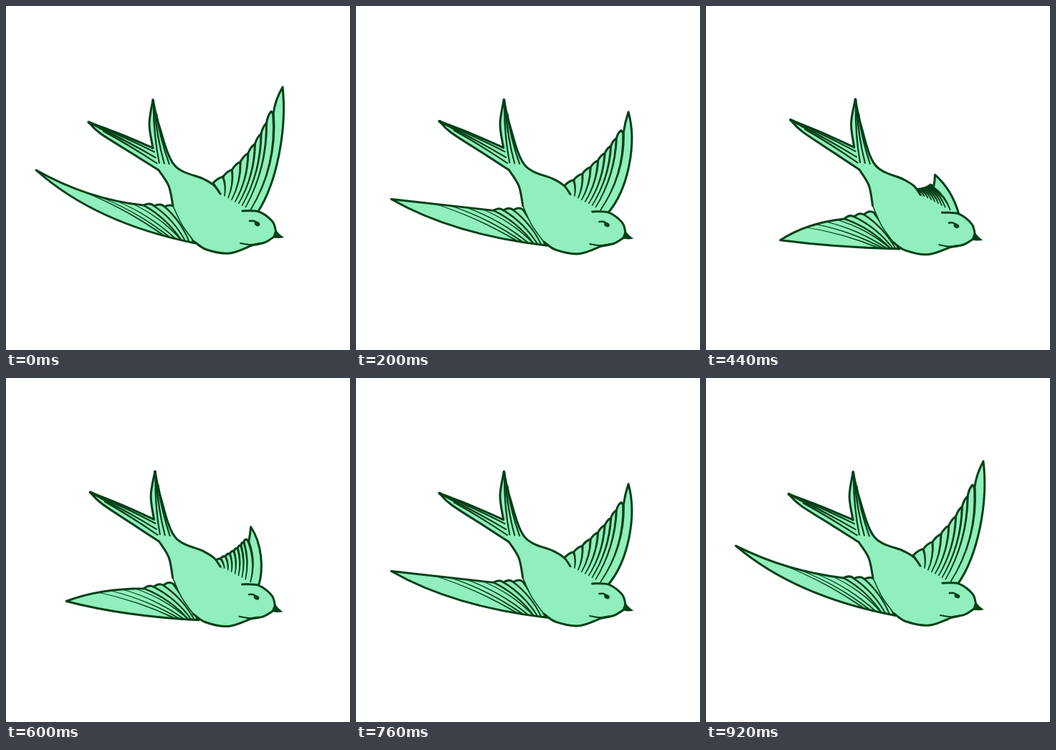
Animation, 480 px wide and 480 px high, one loop 960 ms. Source, as an HTML page with a canvas:

```html
<!DOCTYPE html>
<html lang="en">
<head>
<meta charset="utf-8">
<title>Swallow</title>
<style>
html, body { margin: 0; width: 100%; height: 100%; overflow: hidden; background: #fff; }
canvas { display: block; width: 480px; height: 480px; }
</style>
</head>
<body>
<canvas id="stage" width="480" height="480"></canvas>
<script>
const ctx = document.getElementById('stage').getContext('2d');
const LOOP = 960, STEP = 40;
const FILL = '#90efbc', INK = '#033f18';
const OUTLINE = 3;

const mix = (a, b, t) => a.map((v, i) => v + (b[i] - v) * t);
const curveAt = (a, c, b, t) => mix(mix(a, c, t), mix(c, b, t), t);

// Parabola through the raised, level and lowered positions of a point.
const swing = (up, level, down) => d => up.map((v, i) =>
  v * (1 - d) * (1 - 2 * d) + level[i] * 4 * d * (1 - d) + down[i] * d * (2 * d - 1));

const NEAR = {
  tip: swing([42, 229], [54, 278], [104, 327]),
  upper: swing([115, 270], [115, 279], [140, 303]),
  lower: swing([125, 303], [140, 322], [182, 337]),
  shoulder: swing([192, 278], [192, 287], [193, 297]),
  top: swing([236, 281], [233, 285], [234, 288]),
  root: swing([264, 331], [267, 335], [270, 339])
};
const FAR = {
  tip: swing([386, 113], [375, 158], [319, 236]),
  second: swing([370, 147], [366, 182], [314, 250]),
  trail: swing([346, 214], [342, 222], [308, 256]),
  back: swing([289, 247], [291, 252], [293, 257]),
  lead: swing([392, 170], [388, 198], [335, 250]),
  wrist: swing([379, 245], [378, 258], [347, 270]),
  front: swing([351, 288], [351, 290], [353, 291])
};
const pose = (wing, d) =>
  Object.fromEntries(Object.entries(wing).map(([name, at]) => [name, at(d)]));

// 0 with the wings raised, 1 with them lowered
function dropAt(t) {
  const s = 1 - Math.abs(1 - t / (LOOP / 2));
  return 0.525 * (s + (1 - Math.cos(Math.PI * s)) / 2);
}

// Continues the path smoothly through the points, starting at the first.
function spline(p) {
  for (let i = 0; i < p.length - 1; i++) {
    const a = p[i - 1] || p[i], b = p[i], c = p[i + 1], d = p[i + 2] || c;
    ctx.bezierCurveTo(
      b[0] + (c[0] - a[0]) / 6, b[1] + (c[1] - a[1]) / 6,
      c[0] - (d[0] - b[0]) / 6, c[1] - (d[1] - b[1]) / 6, ...c);
  }
}

function line(points, width = OUTLINE) {
  ctx.beginPath();
  ctx.moveTo(...points[0]);
  spline(points);
  ctx.lineWidth = width;
  ctx.stroke();
}

// Point beside the segment a-b at share t, moved off by the distance k.
function beside(a, b, t, k) {
  const dx = b[0] - a[0], dy = b[1] - a[1], len = Math.hypot(dx, dy) || 1;
  const p = mix(a, b, t);
  return [p[0] + dy / len * k, p[1] - dx / len * k];
}

// A bowed stroke that changes from width w at a to w2 at b.
function taper(a, b, bow, w, w2) {
  const off = bow * Math.hypot(b[0] - a[0], b[1] - a[1]), half = (w + w2) / 4;
  ctx.beginPath();
  ctx.moveTo(...beside(a, b, 0, w / 2));
  ctx.quadraticCurveTo(...beside(a, b, 0.5, off + half), ...beside(a, b, 1, w2 / 2));
  ctx.lineTo(...beside(a, b, 1, -w2 / 2));
  ctx.quadraticCurveTo(...beside(a, b, 0.5, off - half), ...beside(a, b, 0, -w / 2));
  ctx.fill();
}

function scallops(notches, lift) {
  for (let i = 1; i < notches.length; i++) {
    const a = notches[i - 1], b = notches[i];
    ctx.quadraticCurveTo(...beside(a, b, 0.6, lift), ...b);
  }
}

function paint() {
  ctx.closePath();
  ctx.fillStyle = FILL;
  ctx.fill();
  ctx.lineWidth = OUTLINE;
  ctx.stroke();
  ctx.fillStyle = INK;
}

function drawNearWing(d) {
  const { tip, upper, lower, shoulder, top, root } = pose(NEAR, d);
  const notches = [0, 1, 2, 3].map(i => mix(shoulder, top, i / 3));

  ctx.beginPath();
  ctx.moveTo(...tip);
  ctx.quadraticCurveTo(...upper, ...shoulder);
  scallops(notches, 5);
  ctx.lineTo(...root);
  ctx.quadraticCurveTo(...lower, ...tip);
  paint();

  // feathers sweep from the upper edge down to the root
  for (let i = 0; i < 4; i++) {
    const start = curveAt(tip, upper, shoulder, 0.45 + i * 0.15);
    const end = curveAt(tip, lower, root, 0.84 + i * 0.03);
    taper(start, end, 0.06 + i * 0.015, 1, 2);
  }
  notches.forEach((p, i) => {
    taper(p, curveAt(tip, lower, root, 0.93 + i * 0.02), 0.12, 2.6, 1.9);
  });
}

function drawFarWing(d) {
  const { tip, second, trail, back, lead, wrist, front } = pose(FAR, d);
  const count = 8;
  const notches = Array.from({ length: count + 1 },
    (_, i) => curveAt(back, trail, second, i / count));
  const gap = [second[0] + 3, second[1] + 4];

  ctx.beginPath();
  ctx.moveTo(...back);
  scallops(notches, 2.5);
  ctx.lineTo(...gap);
  ctx.quadraticCurveTo(gap[0] + 2, (gap[1] + tip[1]) / 2, ...tip);
  ctx.bezierCurveTo(...lead, ...wrist, ...front);
  ctx.lineTo(330, 296);
  ctx.lineTo(302, 268);
  paint();

  for (let i = 1; i < count; i++) {
    taper(notches[i], mix([300, 263], [339, 284], i / count), 0.13, 3.2, 1.6);
  }
  taper(gap, [341, 285], 0.16, 3.8, 1.8);
}

const TAIL_LEFT = [115, 162], TAIL_UP = [205, 131], CROTCH = [205, 198];
const TAIL_UNDER = [[213, 229], [178, 207], [132, 178], TAIL_LEFT];
const TAIL_INNER = [TAIL_LEFT, [160, 179], CROTCH];
const TAIL_EDGE = [CROTCH, [200, 165], TAIL_UP];
const BACK = [TAIL_UP, [214, 168], [235, 222], [275, 241], [290, 250], [299, 262]];
const HEAD = [[330, 286], [353, 287], [372, 301], [377, 317]];
const THROAT = [[374, 322], [361, 330], [343, 334]];
const BELLY = [[343, 334], [312, 345], [280, 340], [263, 329]];
const FLANK = [[263, 329], [246, 306], [233, 279]];
const RUMP = [[233, 279], [227, 251], [213, 229]];

// Three fanned quills from the tip to the base between a and b.
function quills(tip, a, b, bow) {
  for (let i = 1; i <= 3; i++) {
    const base = mix(a, b, i / 4);
    taper(mix(tip, base, 0.06 + 0.05 * i), base, bow, 2.6, 2);
  }
  taper(tip, mix(tip, mix(a, b, 0.5), 0.22), bow, 4, 2);
}

function drawBody(d) {
  ctx.save();
  ctx.translate(275 - d, 300 + d * 0.8);
  ctx.rotate(0.026 * d);
  ctx.translate(-275, -300);

  ctx.beginPath();
  ctx.moveTo(...TAIL_UNDER[0]);
  for (const edge of [TAIL_UNDER, TAIL_INNER, TAIL_EDGE, BACK, HEAD, THROAT, BELLY, FLANK, RUMP]) {
    ctx.lineTo(...edge[0]);
    spline(edge);
  }
  ctx.fillStyle = FILL;
  ctx.fill();
  ctx.fillStyle = INK;

  [TAIL_UNDER, TAIL_INNER, TAIL_EDGE, BACK, HEAD, THROAT, BELLY, RUMP].forEach(p => line(p));
  line(FLANK, 1.5);
  quills(TAIL_LEFT, [206, 196], [213, 228], 0.02);
  quills(TAIL_UP, [207, 219], [235, 222], -0.05);

  // beak
  ctx.beginPath();
  ctx.moveTo(376, 311);
  ctx.quadraticCurveTo(380, 318, 388, 323);
  ctx.quadraticCurveTo(380, 325, 372, 323);
  ctx.fill();

  // cheek and eye
  line([[327, 331], [341, 333], [354, 331]], 2);
  line([[340, 300], [346, 300], [352, 304]], 2.6);
  ctx.beginPath();
  ctx.ellipse(350.5, 304, 4, 3, 0.45, 0, Math.PI * 2);
  ctx.fill();
  ctx.restore();
}

function render(now) {
  const d = dropAt(Math.floor((now % LOOP) / STEP) * STEP);
  ctx.fillStyle = '#fff';
  ctx.fillRect(0, 0, 480, 480);
  ctx.strokeStyle = INK;
  ctx.lineJoin = ctx.lineCap = 'round';
  drawFarWing(d);
  drawNearWing(d);
  drawBody(d);
}

let start;
function tick(now) {
  start ??= now;
  render(now - start);
  requestAnimationFrame(tick);
}
render(0);
requestAnimationFrame(tick);
</script>
</body>
</html>
```
